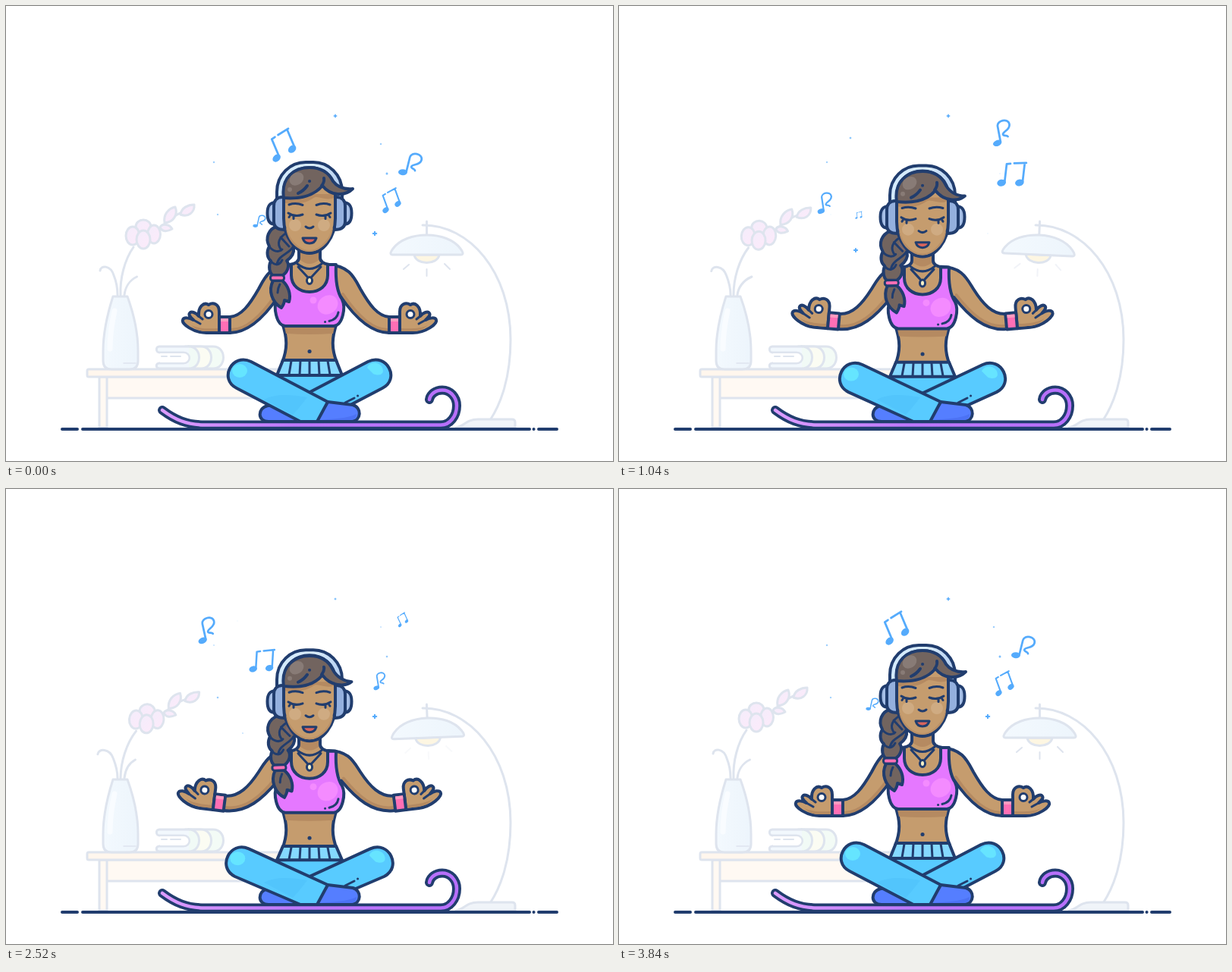
Write an HTML page that moves like this. It is 800x600 px and loops after 3880 ms.

```html
<!DOCTYPE html>
<html lang="en">
<head>
<meta charset="utf-8">
<title>Meditation with music</title>
<style>
  html, body { margin: 0; width: 100%; height: 100%; overflow: hidden; background: #fff; }
  svg { display: block; width: 800px; height: 600px; fill: none; stroke-linecap: round; stroke-linejoin: round; }
  .room { stroke: #dee4ee; stroke-width: 3; }
  .ink { stroke: #213d6e; stroke-width: 4; }
  .thin { stroke-width: 3; }
  .flat { stroke: none; }
  .skin { fill: #c59c6e; }
  .shade { fill: #b58a61; }
  .hair { fill: #72645f; }
  .pants { fill: #58cbff; }
  .shoe { fill: #557eff; }
  .pink { fill: #ff6fb5; }
  .note { stroke: #55abfc; stroke-width: 2.8; }
  .head { fill: #55abfc; stroke: none; }
  .star { stroke: #55abfc; stroke-width: .9; }
</style>
</head>
<body>
<svg viewBox="0 0 800 600">
  <defs>
    <linearGradient id="mat"><stop stop-color="#dc9cff"/><stop offset=".45" stop-color="#bd78fc"/><stop offset="1" stop-color="#b76ffa"/></linearGradient>
    <linearGradient id="glass"><stop stop-color="#f3f9fe"/><stop offset="1" stop-color="#edf5fc"/></linearGradient>
    <linearGradient id="petal" x2="1" y2="1"><stop stop-color="#f3edfb"/><stop offset="1" stop-color="#fdeafa"/></linearGradient>
    <linearGradient id="band"><stop stop-color="#d3eaff"/><stop offset=".6" stop-color="#d9ecf9"/><stop offset="1" stop-color="#b3cdf0"/></linearGradient>
    <path id="board" d="M206 533C222 545 238 552.500 262 552.500H573C585 552.500 594 541 594 527C594 515.500 585.500 506.500 575 506.500C566 506.500 559 512 558 519"/>
    <g id="double">
      <path d="M-9-12V13M15-16V9M-9-12L-4-13M1-14L17-16.500"/>
      <ellipse class="head" cx="-13" cy="14" rx="6" ry="4.500" transform="rotate(-20 -13 14)"/>
      <ellipse class="head" cx="11" cy="11" rx="6" ry="4.500" transform="rotate(-20 11 11)"/>
    </g>
    <g id="single">
      <path d="M-5 12V-9C-5-17 11-18 11-9C11-1 0-1 0 3C0 6 5 4 6 7"/>
      <ellipse class="head" cx="-9.500" cy="13" rx="6" ry="4" transform="rotate(-12 -9 13)"/>
    </g>
  </defs>

  <g class="room">
    <path fill="#fff9f3" d="M123 489H133V556H123ZM133 489H340V517H133Z"/>
    <rect fill="#fff6ed" x="107" y="479" width="275" height="10" rx="2"/>
    <g fill="#f3fbf6">
      <path d="M240 449H273C291 449 291 478 273 478H240Z"/>
      <path fill="#fbfcf3" d="M240 449H257C275 449 275 478 257 478H240Z"/>
      <path fill="#f1faf6" d="M236 449H241C259 449 259 478 241 478H236Z"/>
      <path fill="#f2f8fd" d="M241 449H202C197 449 197 457 203 457H234C244 457 244 471 234 471H202C197 471 197 478 202 478H241"/>
      <path fill="#fff" stroke-width="2" d="M203 457H234C244 457 244 471 234 471H203M205 462H212M217 462H230"/>
    </g>

    <path d="M124 349C125 341 138 342 142 355C146 365 147 372 147 381" data-to="M120 350C121 342 136 342 141 355C145 365 147 372 147 381"/>
    <path id="sprout"/>
    <g fill="url(#petal)" data-move="0 0 4.2 151 381">
      <path fill="none" d="M151 381C150 360 156 335 168 318M200 295C209 288 218 277 230 273"/>
      <path d="M203 292C206 286 216 288 219 294C212 298 206 298 203 292Z"/>
      <path d="M209 286C207 275 214 267 223 265C227 275 221 285 209 286Z"/>
      <path d="M230 275C231 266 240 262 248 262C249 272 240 279 230 275Z"/>
      <ellipse cx="181" cy="291" rx="10" ry="9"/>
      <ellipse cx="167" cy="303" rx="9" ry="12"/>
      <ellipse cx="195" cy="301" rx="8.500" ry="12"/>
      <ellipse cx="181" cy="308" rx="9" ry="12"/>
    </g>
    <path fill="url(#glass)" d="M141 383H160C168 405 174 430 174 455V468Q174 479 163 479H139Q128 479 128 468V455C128 430 134 405 141 383Z"/>
    <path stroke="#f9fcff" stroke-width="7" d="M143 402C139 420 137 435 137 452"/>
    <path stroke-width="1.500" d="M155 471H171"/>

    <path d="M549 289C610 288 665 350 665 440C665 490 652 525 638 546"/>
    <path fill="#f0f4f9" d="M593 556C605 554 606 545 622 545H667Q671 545 671 549V556Z"/>
    <g id="lamp">
      <path d="M554.500 284V304"/>
      <path fill="#fdf6e2" d="M538 328C540 342 569 342 571 328Z"/>
      <path fill="url(#glass)" d="M510 328C505 328 507 324 510 320C519 308 536 302 554.500 302C573 302 590 308 599 320C602 324 604 328 599 328Z"/>
      <path id="rays" stroke-width="2" d="M554.500 347V356M531 341L524 347M578 340L585 347"/>
    </g>
  </g>

  <path class="ink" d="M74 558H94M101 558H690M695.500 558h.1M702 558H726"/>

  <g class="ink">
    <use href="#board" stroke-width="12"/>
    <use href="#board" stroke="url(#mat)" stroke-width="4.500"/>

    <g id="arm">
      <path class="skin flat" d="M424 341C452 342 459 358 467 373C479 394 490 409 505 410L505 431C480 431 458 408 441 383Z" data-to="M424 346C452 345 459 362 467 373C480 392 494 405 512 403L515 422C484 427 462 408 442 385Z"/>
      <path stroke="#b58a61" d="M503 427C482 427 461 405 444 380" data-to="M513 418C485 423 465 405 445 382"/>
      <path d="M424 341C452 342 459 358 467 373C479 394 490 409 505 410M505 431C480 431 458 408 441 383" data-to="M424 346C452 345 459 362 467 373C480 392 494 405 512 403M515 422C484 427 462 408 442 385"/>
      <g data-move="9 -8 -9 505 420">
        <path class="skin" d="M519 431V403C519 393 527 390 533 394C539 390 547 396 546 409C550 404 556 402 558 405C560 408 556 411 553 414C558 411 566 410 567 414C569 419 553 431 536 431Z"/>
        <path class="flat shade" d="M521 429V425C535 426 548 425 556 421C549 427 543 429 536 429Z"/>
        <path class="thin" d="M553 414L544 419M546 409L541 413"/>
        <circle class="thin" cx="533" cy="406.500" r="5" fill="#fff"/>
        <path class="pink" d="M505 410H519V431H505Z"/>
        <path stroke="#ff9cc0" stroke-width="4" stroke-linecap="butt" d="M507 414H517"/>
      </g>
    </g>
    <use href="#arm" transform="matrix(-1 0 0 1 800 0)"/>

    <g data-move="0 6">
      <path class="skin" d="M364 418C371 438 371 452 364 470H436C429 452 429 438 436 418Z"/>
      <path class="flat shade" d="M367 423H433L431 432Q400 434 369 432Z"/>
      <path stroke-width="5" d="M400 455.500h.1"/>
    </g>

    <path class="pants flat" d="M357 487L340 497V520H460V497L443 487Z"/>
    <path fill="#85d9ff" d="M365 467L435 467L443 487L357 487Z" data-to="M365 472L435 472L443 490L357 490Z"/>
    <path class="thin" d="M376 468L373 486M388 468L387 486M400 468L400 486M412 468L413 486M424 468L427 486" data-to="M376 474L373 489M388 474L387 489M400 474L400 489M412 474L413 489M424 474L427 489"/>

    <path class="shoe" d="M345 527C331 530 331 548 346 548H410V527Z"/>
    <use href="#leg" transform="matrix(-1 0 0 1 800 0)"/>
    <path class="flat" fill="#66e4ff" d="M476 477C480 468 492 469 496 477C500 487 490 488 484 485Z" data-move="3.500 8"/>
    <path class="thin" d="M447 523L459 517M463.500 514h.1"/>
    <path class="shoe" d="M424 522L457 526C469 529 469 547 455 548H408Z"/>
    <path class="flat" fill="#4c72f4" d="M414 546C432 544 450 544 462 538C462 543 459 546 454 546Z"/>
    <path id="leg" class="pants" d="M424 522L323 469C298 457 280 492 304 504L388 548L410 548Z" data-to="M424 522L319 476C294 465 277 501 301 513L388 548L410 548Z"/>
    <ellipse class="flat" fill="#65e5ff" cx="308" cy="481" rx="10" ry="9" data-move="-3.500 8"/>
    <path class="flat" fill="#52c5fc" d="M340 519C355 511 373 512 397 516C388 528 381 536 378 539Z"/>

    <g data-move="0 6">
      <path class="skin" d="M386 320V332Q386 339 374 341V360C376 386 424 386 426 360V341Q414 339 414 332V320Z"/>
      <path class="flat shade" d="M388 322H412V335Q400 345 388 335Z"/>
      <path class="thin" d="M384 340Q400 353 416 340M385 344L397 357M415 344L403 357"/>
      <ellipse class="thin" fill="#fdf4c8" cx="400" cy="362" rx="3.500" ry="4.500"/>
      <path fill="#e578ff" d="M376 341V355C376 369 387 377 400 377C413 377 424 369 424 355V341H435C434 362 437 378 443 387C448 397 444 421 432 422H368C356 421 352 397 357 387C363 378 366 362 365 341Z"/>
      <g class="flat" fill="#f48bff">
        <ellipse cx="424" cy="394" rx="14" ry="12" transform="rotate(-35 424 394)"/>
        <circle cx="405" cy="388" r="4.500"/>
      </g>
      <path class="thin" d="M426 415.500C433 414 437 410 438 404M420.500 416.500h.1"/>
    </g>

    <g data-move="0 11.500 -2.700 362 292">
      <path class="hair" d="M352 362C345 376 351 391 363 398C365 395 367 392 367 388L373 390C376 380 372 369 364 362Z"/>
      <path class="hair" d="M358 290C346 294 341 306 347 317C343 324 344 332 349 336C345 345 348 352 351 355H365C372 350 374 341 370 336C377 331 380 325 379 319C383 315 384 306 378 296Z"/>
      <path class="flat" fill="#7d6869" d="M370 300L379 303Q381 311 376 316L367 314Z"/>
      <path class="thin" d="M370 299C360 305 356 313 363 322M347 317C351 323 359 326 364 321M378 318C373 327 359 328 357 341M349 336C353 342 360 343 364 335M362 305L373 317M358 378C358 372 360 369 361 367"/>
      <rect class="pink thin" x="348.500" y="355" width="18" height="7" rx="3"/>
    </g>

    <g data-move="0 8">
      <path fill="url(#band)" d="M357 264V245C357 222 375 206 395 206H405C425 206 443 222 443 245V264Z"/>
      <g data-move="0 1">
        <g id="ear">
          <path fill="#a5bee6" d="M356 259C347 259 344.500 264 344.500 273C344.500 283 347 288 356 288Z"/>
          <path fill="#94b0de" d="M367 252H364C356 252 353 258 353 264V284C353 291 357 295 367 295Z"/>
        </g>
        <use href="#ear" transform="matrix(-1 0 0 1 800 0)"/>
      </g>
      <path class="skin" d="M366 246C366 202 434 202 434 246V280C434 305 418 326 400 326C382 326 366 305 366 280Z"/>
      <path class="flat shade" d="M368 248H432V253C420 258 411 248 404 254C392 262 379 261 368 260Z"/>
      <path class="flat" fill="#ba9066" d="M369 291C374 309 387 322 400 322C413 322 426 309 431 291C431 309 414 324 400 324C386 324 370 311 369 291Z"/>
      <path class="thin" d="M373 262Q382 259 391 262.500M427 262Q418 259 409 262.500"/>
      <g class="thin" data-move="0 2">
        <g class="flat" fill="#cfab82"><circle cx="381" cy="289" r="8"/><circle cx="419" cy="289" r="8"/></g>
        <path id="eye" d="M372 273Q381 279 391 275M374 277L373 278.500M379 277.500V280.500"/>
        <use href="#eye" transform="matrix(-1 0 0 1 800 0)"/>
        <path d="M395 291Q400 295 405 291"/>
        <path fill="#d9645c" d="M391 306H409Q407 313 400 313Q393 313 391 306Z"/>
      </g>
      <path class="hair" d="M366 253C362 226 380 213 400 213C416 213 426 221 431 231C437 239 446 242 457 241C447 251 428 251 417 237C407 249 389 255 366 253Z" data-to="M366 254C362 228 380 214 400 214C416 214 426 222 431 233C436 243 446 249 455 250C447 256 428 255 417 240C407 252 389 257 366 254Z"/>
      <g data-move="0 2">
        <g class="flat" fill="#887b76"><ellipse cx="383" cy="228" rx="10" ry="8" transform="rotate(-35 383 228)"/><circle cx="374" cy="242" r="3"/></g>
        <path d="M385 247Q392 244 397 237M400 231h.1M419 227Q420 232 416 237"/>
      </g>
    </g>
  </g>
  <g id="sky"></g>
</svg>

<script>
const LOOP = 3880, STEP = 40, CYCLE = LOOP - STEP;
const $ = id => document.getElementById(id);
const clamp = (v, a, b) => Math.max(a, Math.min(b, v));
const mix = (a, b, u) => a + (b - a) * u;
const NUMBER = /-?\d*\.?\d+/g;

const add = (cls, content) => {
  const g = document.createElementNS('http://www.w3.org/2000/svg', 'g');
  g.setAttribute('class', cls);
  g.innerHTML = content;
  $('sky').append(g);
  return g;
};

// Path keys: time, x, y, angle
const notes = [
  { id: 'double', born: 970, keys: [[1480,318,266,-8],[2120,324,238,-18],[2880,351,217,22],[3200,363,208,11],[3840,363,183,-23],[4480,354,159,0]] },
  { id: 'single', born: 1890, keys: [[2120,480,260,5],[2880,506,245,-20],[3200,519,234,-4],[3840,535,209,14],[4480,517,181,-18],[5320,495,154,2]] },
  { id: 'double', born: 2860, keys: [[3200,482,273,5],[3840,506,256,-20],[4480,528,235,8],[5320,506,205,-1],[5960,518,180,-19]] },
  { id: 'single', born: 3700, keys: [[3840,335,284,12],[4480,294,272,-19],[5320,255,242,8],[5960,268,208,12],[6720,261,168,-34],[7040,254,158,-32]] }
];
notes.forEach(n => n.el = add('note', `<use href="#${n.id}"/>`));

// Twinkle sizes at each of the shared times
const twinkleTimes = [0, 640, 1480, 2120, 2880, 3200, 3840];
const stars = [
  [434, 145, [2.3, 3, 1.5, .3, 2.3, 0]],
  [274, 206, [1, .4, 1.5, 0, 1, 3.3]],
  [305, 174, [0, 1.2, 1.3, .3, 0, .8]],
  [494, 182, [1, 1.3, .7, 0, 1, 0]],
  [502, 221, [1.5, .5, 0, .7, 1.5, 0]],
  [312, 322, [0, 2.5, 3.2, 1.1, 0, 2.5]],
  [279, 275, [.9, 0, .3, 1.3, .9, 1]],
  [486, 300, [3, 0, .4, 3, 3, 2]]
].map(([x, y, sizes]) => ({ x, y, sizes, el: add('star', '<path d="M-1 0H1M0-1V1"/>') }));

const morphs = [...document.querySelectorAll('[data-to]')].map(el => ({
  el, from: el.getAttribute('d'), to: el.dataset.to.match(NUMBER)
}));
const moves = [...document.querySelectorAll('[data-move]')].map(el => ({
  el, by: el.dataset.move.split(' ').map(Number)
}));

// Smooth curve through the keys, carried on straight past both ends
function along(keys, t) {
  let i = 0;
  while (i < keys.length - 2 && t > keys[i + 1][0]) i++;
  const b = keys[i], c = keys[i + 1], a = keys[i - 1] || b, d = keys[i + 2] || c;
  const raw = (t - b[0]) / (c[0] - b[0]), u = clamp(raw, 0, 1);
  return [1, 2, 3].map(k => b[k] + (raw - u) * (c[k] - b[k]) / 2 + u / 2 * (c[k] - a[k]
    + u * (2 * a[k] - 5 * b[k] + 4 * c[k] - d[k] + u * (3 * (b[k] - c[k]) + d[k] - a[k]))));
}

function drawNote({ el, keys, born }, t) {
  const age = (t - born + CYCLE) % CYCLE, left = CYCLE - age;
  const [x, y, angle] = along(keys, born + age);
  const size = Math.min(.5 + age * .00025, .98, left / 800) * Math.min(1, age / 140);
  el.setAttribute('transform', `translate(${x} ${y}) rotate(${angle}) scale(${size})`);
}

function drawStar({ el, x, y, sizes }, t) {
  let i = 0;
  while (i < 5 && t >= twinkleTimes[i + 1]) i++;
  const u = (t - twinkleTimes[i]) / (twinkleTimes[i + 1] - twinkleTimes[i]);
  const size = mix(sizes[i], sizes[(i + 1) % 6], u) * .75;
  el.setAttribute('transform', `translate(${x} ${y}) scale(${size})`);
}

function draw(now) {
  const t = Math.floor(now % LOOP / STEP) * STEP % CYCLE;
  const phase = t / CYCLE * 2 * Math.PI;
  const breath = (1 - Math.cos(phase)) / 2, sway = Math.sin(phase);

  for (const { el, from, to } of morphs) {
    let i = 0;
    el.setAttribute('d', from.replace(NUMBER, n => mix(+n, +to[i++], breath).toFixed(2)));
  }
  for (const { el, by: [x, y, turn = 0, cx = 0, cy = 0] } of moves)
    el.setAttribute('transform', `translate(${x * breath} ${y * breath}) rotate(${turn * breath} ${cx} ${cy})`);

  $('sprout').setAttribute('d', `M156 381C157 372 ${162 + sway} 362 ${172.5 + 2.5 * sway} 357`);
  $('lamp').setAttribute('transform', `rotate(${2.6 * sway} 554.5 286)`);
  $('rays').setAttribute('opacity', 1 - breath);
  notes.forEach(n => drawNote(n, t));
  stars.forEach(s => drawStar(s, t));
  requestAnimationFrame(draw);
}
draw(performance.now());
</script>
</body>
</html>
```
